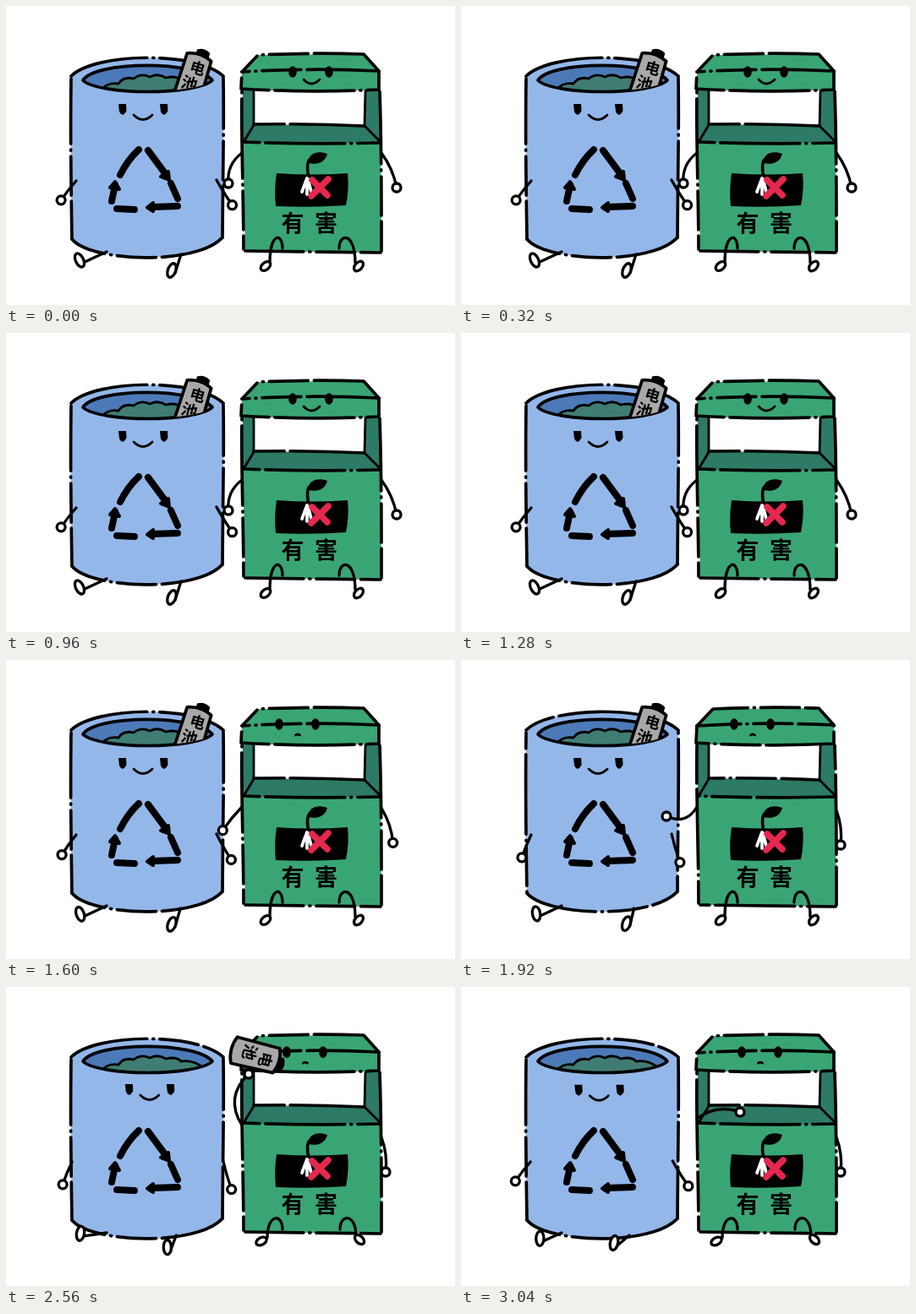
Animation of 531 by 354 pixels, one loop 3200 ms. Source, as an HTML page:

```html
<!DOCTYPE html>
<html lang="zh">
<head>
<meta charset="utf-8">
<title>Two bins and a battery</title>
<style>
html, body { margin: 0; width: 100%; height: 100%; overflow: hidden; background: #fff; }
svg { display: block; width: 100vw; height: 100vh; }
.ink { fill: none; stroke: #000; stroke-width: 3.7; stroke-linecap: round; stroke-linejoin: round; }
.thin { stroke-width: 2.8; }
.bold { stroke-width: 8; }
.limb { stroke-width: 3.3; }
.limb circle, .limb ellipse { fill: #fff; }
.dash { stroke-dasharray: 94 7 1 7 46 7; }
text { font-family: "Noto Sans CJK SC", "Noto Sans CJK", sans-serif; font-weight: 700; text-anchor: middle; dominant-baseline: central; }
</style>
</head>
<body>
<svg viewBox="0 0 531 354">
  <defs>
    <path id="mouthShape" d="M91 88C105 65 225 64 244 88C225 106 110 106 91 88Z"/>
    <clipPath id="hole"><use href="#mouthShape"/></clipPath>
    <clipPath id="inside"><path d="M91 30H275V88H244C225 105 110 105 91 88Z"/></clipPath>
  </defs>

  <g id="blueBin">
    <path fill="#94b7ea" d="M77 83C105 55 225 53 257 83C258 150 256 220 256 274C225 308 100 303 78 276C77 220 76 150 77 83Z"/>
    <use href="#mouthShape" fill="#4c7ab8"/>
    <path class="ink thin" clip-path="url(#hole)" style="fill:#3f7d73" d="M114 98Q121 90 133 92Q139 83 151 86Q160 79 170 84Q180 79 189 85Q202 82 207 88Q222 86 232 95L220 110H120Z"/>
    <g class="ink">
      <use href="#mouthShape"/>
      <path class="dash" d="M77 83C105 55 225 53 257 83"/>
      <path class="dash" d="M77 86C76 150 77 220 78 276"/>
      <path class="dash" d="M257 85C258 150 256 220 256 274"/>
      <path class="dash" d="M78 276C100 303 225 308 256 274"/>
    </g>
    <g class="ink bold">
      <path d="M135 200Q144 182 157 170M168 171L188 198M195 210L203 228M203 237L172 238M131 240L152 241M125 231L129 212"/>
      <path fill="#000" stroke-width="4" d="M183 202L192 196L193 206ZM174 233V243L167 238.500ZM123 215L129 208L134 217Z"/>
    </g>
    <g id="blueFace">
      <path d="M133 116H142L142.500 124Q138 133 134 125ZM182 116H191L191.500 124Q187 133 183 125Z"/>
      <path class="ink thin" d="M151 129Q162 140 173 129"/>
    </g>
  </g>

  <g id="greenBin">
    <path fill="#3aa574" d="M298 58L423 57L441 77V100H279V78ZM280 161L443 162L444 292L283 290Z"/>
    <path fill="#2d7a66" d="M280 100H293V140L424 142V100H441L443 162H280Z"/>
    <g class="ink">
      <path class="dash" d="M279 78L298 58Q360 55 423 57L441 77"/>
      <path class="dash" d="M279 78Q360 73 441 77"/>
      <path class="dash" d="M279 78L278 98Q360 103 441 99L441 78"/>
      <path class="thin" d="M293 101V140M425 101L424 141M293 141L281 161M424 142L443 161"/>
      <path class="dash" d="M293 140Q360 139 424 142"/>
      <path class="dash" d="M281 161Q360 164 443 162"/>
      <path class="dash" d="M279 101C278 160 281 230 281 288"/>
      <path class="dash" d="M442 101C444 160 444 230 444 290"/>
      <path class="dash" d="M283 290Q360 291 443 292"/>
    </g>
    <path d="M320 198Q362 201 404 198Q406 217 402 236Q362 239 319 237Q317 217 320 198Z"/>
    <path class="ink" d="M358 203Q354 184 361 180"/>
    <path d="M358 186C357 173 370 171 380 175C377 187 365 188 358 186Z"/>
    <path class="ink" style="stroke:#fff" d="M356 204L350 220M356 204V223M357 205L361 220"/>
    <path class="ink" style="stroke:#e5284e;stroke-width:7.500" d="M362 206L380 224M381 205L361 225"/>
    <text x="339" y="255.500" font-size="27">有</text>
    <text x="378.500" y="255.500" font-size="27">害</text>
    <g id="greenFace">
      <ellipse cx="339" cy="78" rx="4.800" ry="6.800"/>
      <ellipse cx="382" cy="78" rx="4.800" ry="6.800"/>
      <path id="mouth" class="ink thin"/>
    </g>
  </g>

  <g id="limbs" class="ink limb"></g>
  <g id="batteryCut">
    <g id="battery">
      <path d="M-4 -28V-33Q3 -37 10 -33V-28Z" stroke="#000" stroke-width="2"/>
      <path class="ink" style="fill:#a8a8a8" d="M-15 -26Q0 -32 15 -25L16 26Q0 33 -16 26Z"/>
      <text x="2" y="-14" font-size="18">电</text>
      <text x="-2" y="6" font-size="19">池</text>
    </g>
  </g>
  <g id="reach" class="ink limb"></g>
</svg>
<script>
const STEP = 160, COUNT = 20;
const GRAB = 15, DROP = 18;
// Reaching hand: step, x, y, bend of the arm
const reachKeys = [
  [9, 263, 210, 11], [12, 243, 185, -17], [14, 240, 90, -20], [16, 287, 103, -25], [19, 330, 148, -14]
];

const $ = id => document.getElementById(id);
const dashes = document.querySelectorAll('.dash');
const clamp = v => Math.max(0, Math.min(1, v));
const mix = (a, b, t) => a + (b - a) * t;
const move = (id, x, y, turn = 0) =>
  $(id).setAttribute('transform', `translate(${x} ${y}) rotate(${turn})`);

function track(keys, i) {
  const n = Math.max(1, keys.findIndex(k => k[0] >= i));
  const a = keys[n - 1], b = keys[n];
  const t = clamp((i - a[0]) / (b[0] - a[0]));
  return a.slice(1).map((v, j) => mix(v, b[j + 1], t));
}

// The bend pushes the middle of the arm sideways
function arm(sx, sy, hx, hy, bend) {
  const dx = hx - sx, dy = hy - sy, k = bend / Math.hypot(dx, dy);
  return `<path d="M${sx} ${sy}Q${sx + dx / 2 - dy * k} ${sy + dy / 2 + dx * k} ${hx} ${hy}"/>
    <circle cx="${hx}" cy="${hy}" r="5"/>`;
}

function hangingArm(sx, sy, length, degrees) {
  const a = degrees * Math.PI / 180;
  return arm(sx, sy, sx + length * Math.sin(a), sy + length * Math.cos(a), 1);
}

const foot = (x, y, turn, rx, ry) =>
  `<ellipse rx="${rx}" ry="${ry}" transform="translate(${x} ${y}) rotate(${turn})"/>`;
const straightLeg = (hx, hy, x, y, turn) =>
  `<path d="M${hx} ${hy}L${x + 4} ${y + 3}"/>` + foot(x, y, turn, 4.6, 8.6);
const bentLeg = (hx, ankle, x, y, turn) =>
  `<path d="M${hx} 287C${hx} 268 ${x + ankle} 268 ${x + ankle} ${y - 4}"/>` + foot(x, y, turn, 4.2, 6.7);

function blueLimbs(sway, late, lean) {
  const spread = 24 + 12 * Math.cos(late * 2 * Math.PI) + 3 * sway;
  return hangingArm(83 - 5 * lean, 207, 29, -spread - 2)
    + hangingArm(249 + 8 * lean, 206, 35, spread - 4)
    + straightLeg(119, 291, 87 + 7 * late - 4 * lean, 301 - 2 * late - 8 * lean,
      -25 * (1 - late) ** 3 + 10 * lean + 6 * sway)
    + straightLeg(207 - 8 * late, 294, 196 - 15 * late ** 3, 313 - 10 * late ** 2,
      20 - 5 * late - 18 * lean - 6 * sway);
}

function greenLimbs(i, sway) {
  const low = clamp((i - 9) / 3), tucked = i >= GRAB;
  return arm(444, 174 + 4 * low, mix(462, 449, low) + sway, mix(215, 219, low), -5)
    + (tucked ? bentLeg(327, 7, 302, 301, 62) + bentLeg(395, -4, 418, 299, -45)
              : bentLeg(327, 5, 307, 308, 50) + bentLeg(394, -4, 417, 308, 42));
}

function draw(i) {
  const calm = i < 9;
  const sway = calm ? Math.round(Math.sin(i * Math.PI / 2)) : 0;
  const late = clamp((i - 9) / 10);
  const lean = Math.exp(-(((i - 16.3) / 2) ** 2));
  const boil = i < 10 ? sway : i % 3 - 1;
  dashes.forEach((line, n) => line.setAttribute('stroke-dashoffset', n * 17 + boil * 43));

  const [hx, hy, bend] = track(reachKeys, i);
  $('limbs').innerHTML = blueLimbs(sway, late, lean) + greenLimbs(i, sway);
  $('reach').innerHTML = arm(279, 174 - 18 * clamp((i - 12) / 7), hx + sway, hy, bend);

  const glance = calm ? 0 : i < GRAB ? Math.max(-16, 8 * (8 - i)) : -7;
  move('blueFace', 8 * lean, -lean);
  move('greenFace', glance, glance / 8);
  $('mouth').setAttribute('d', calm ? 'M352 87Q361 97 371 87' : 'M358.500 91Q361 89 363.500 91');

  const held = i >= GRAB;
  if (held) move('battery', hx + 8, hy - 22 + 22 * Math.max(0, i - 16), 104 + 43 * (i - 16));
  else move('battery', 221, 85 - 5 * Math.abs(sway), 17);
  $('batteryCut').style.display = i < DROP ? '' : 'none';
  $('batteryCut').setAttribute('clip-path', held ? 'none' : 'url(#inside)');
}

let shown = -1;
function tick() {
  const i = Math.floor(performance.now() / STEP) % COUNT;
  if (i !== shown) draw(shown = i);
  requestAnimationFrame(tick);
}
tick();
</script>
</body>
</html>
```
